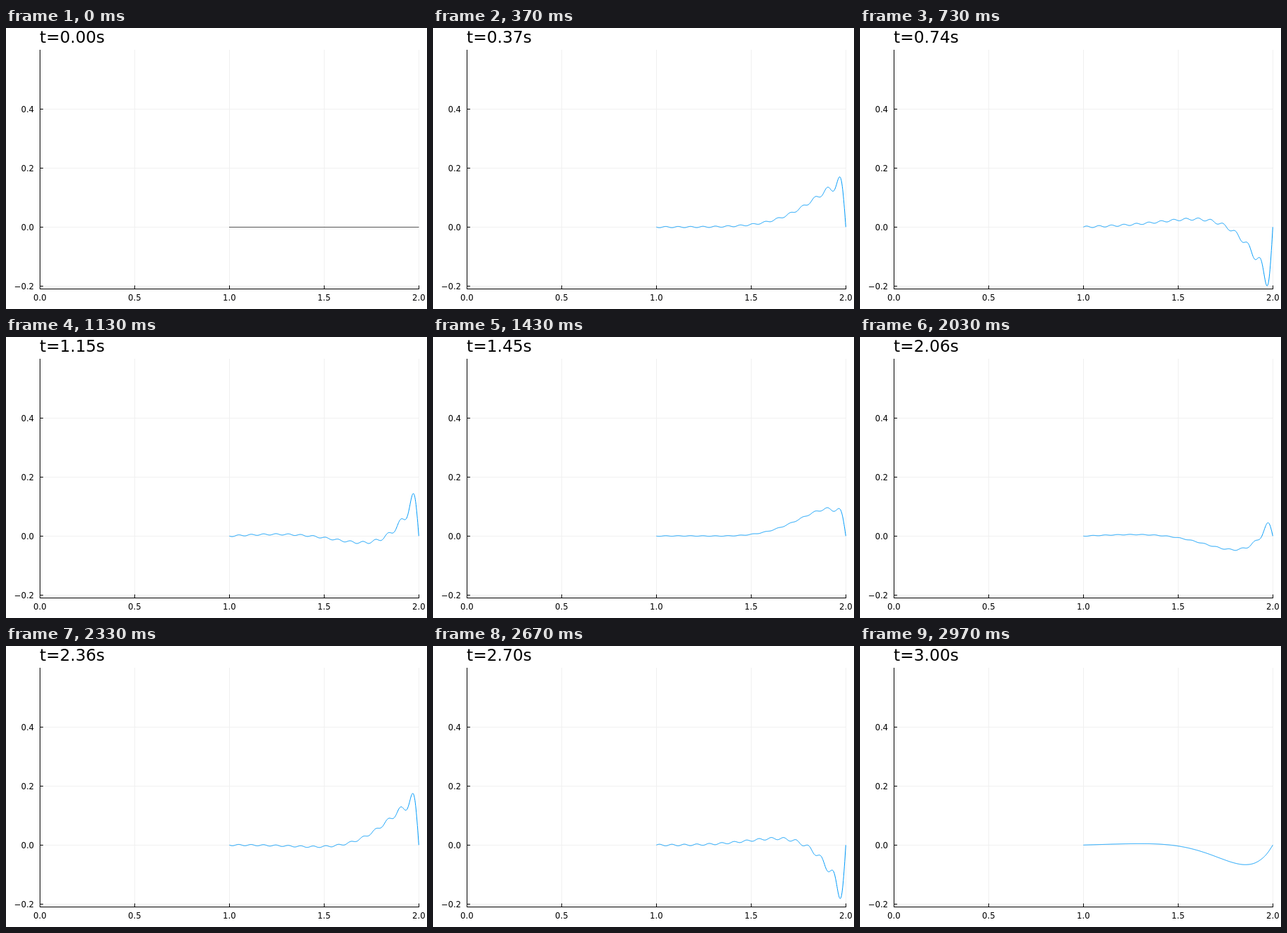
Write an HTML page that moves like this. It is 600 px wide and 400 px high and loops after 3.01 s.

```html
<!DOCTYPE html>
<html lang="en">
<head>
<meta charset="utf-8">
<title>Oscillating boundary</title>
<style>
html, body { margin: 0; width: 100%; height: 100%; overflow: hidden; background: #fff; }
svg { display: block; width: 600px; height: 400px; }
text { font-family: "DejaVu Sans", sans-serif; font-size: 11.65px; fill: #000; }
#title { font-size: 23.3px; }
path { fill: none; stroke-width: 1; }
#grid { stroke: #f0f0f0; }
#axes { stroke: #000; }
#curve { stroke-linejoin: round; }
</style>
</head>
<body>
<svg viewBox="0 0 600 400">
  <path id="grid"/>
  <path id="axes"/>
  <g id="labels"></g>
  <text id="title" x="48" y="21"></text>
  <path id="curve"/>
</svg>
<script>
const $ = id => document.getElementById(id);
const px = r => 48.3 + 270 * r;
const py = u => 283.35 - 419.75 * u;
const crisp = v => Math.floor(v) + 0.5;

function label(text, x, y, anchor) {
  const el = document.createElementNS("http://www.w3.org/2000/svg", "text");
  el.setAttribute("x", x);
  el.setAttribute("y", y);
  el.setAttribute("text-anchor", anchor);
  el.textContent = text;
  $("labels").append(el);
}

function drawFrame() {
  let grid = "", axes = "M48.5 31V372M48 371.5H589";
  for (const r of [0, 0.5, 1, 1.5, 2]) {
    const x = crisp(px(r));
    if (r) grid += `M${x} 31V371`;
    axes += `M${x} 371V366.5`;
    label(r.toFixed(1), px(r), 387.5, "middle");
  }
  for (const u of [-0.2, 0, 0.2, 0.4]) {
    const y = crisp(py(u));
    grid += `M48 ${y}H588.5`;
    axes += `M48 ${y}H53`;
    label(u.toFixed(1).replace("-", "\u2212"), 40, py(u) + 4.3, "end");
  }
  $("grid").setAttribute("d", grid);
  $("axes").setAttribute("d", axes);
}

// Radial diffusion between r = 1 and r = 2, driven by AMP * sin(W t) at r = 2,
// as a truncated sine series scaled by 1 / sqrt(r).
const MODES = 30, D = 0.1, AMP = 0.2, W = 2 * Math.PI;

function modes(t) {
  return Array.from({ length: MODES }, (_, i) => {
    const k = (i + 1) * Math.PI;
    const decay = D * (k * k - 0.125);
    const response = decay * Math.sin(W * t) - W * Math.cos(W * t) + W * Math.exp(-decay * t);
    return 2 * D * k * AMP * response / (decay * decay + W * W);
  });
}

function curvePath(t) {
  const a = modes(t), steps = 540, points = [];
  for (let j = 0; j <= steps; j++) {
    const r = 1 + j / steps;
    let sum = 0;
    a.forEach((c, i) => sum += c * Math.sin((i + 1) * Math.PI * (2 - r)));
    points.push(px(r).toFixed(2) + " " + py(sum * Math.sqrt(2 / r)).toFixed(2));
  }
  return "M" + points.join("L");
}

const FRAMES = 90, LOOP = 3010;
const startOf = i => Math.round(i * 10 / 3) * 10;
let shown = -1;

function show(i) {
  if (i === shown) return;
  shown = i;
  const t = 3 * i / (FRAMES - 1);
  $("title").textContent = `t=${t.toFixed(2)}s`;
  $("curve").setAttribute("d", i ? curvePath(t) : "M318 283.5H588.5");
  $("curve").setAttribute("stroke", i ? "#009afa" : "#555");
}

function tick() {
  const ms = (performance.now() - start) % LOOP;
  let i = Math.min(FRAMES - 1, Math.floor(ms * 0.03) + 1);
  while (startOf(i) > ms) i--;
  show(i);
  requestAnimationFrame(tick);
}

drawFrame();
const start = performance.now();
tick();
</script>
</body>
</html>
```
